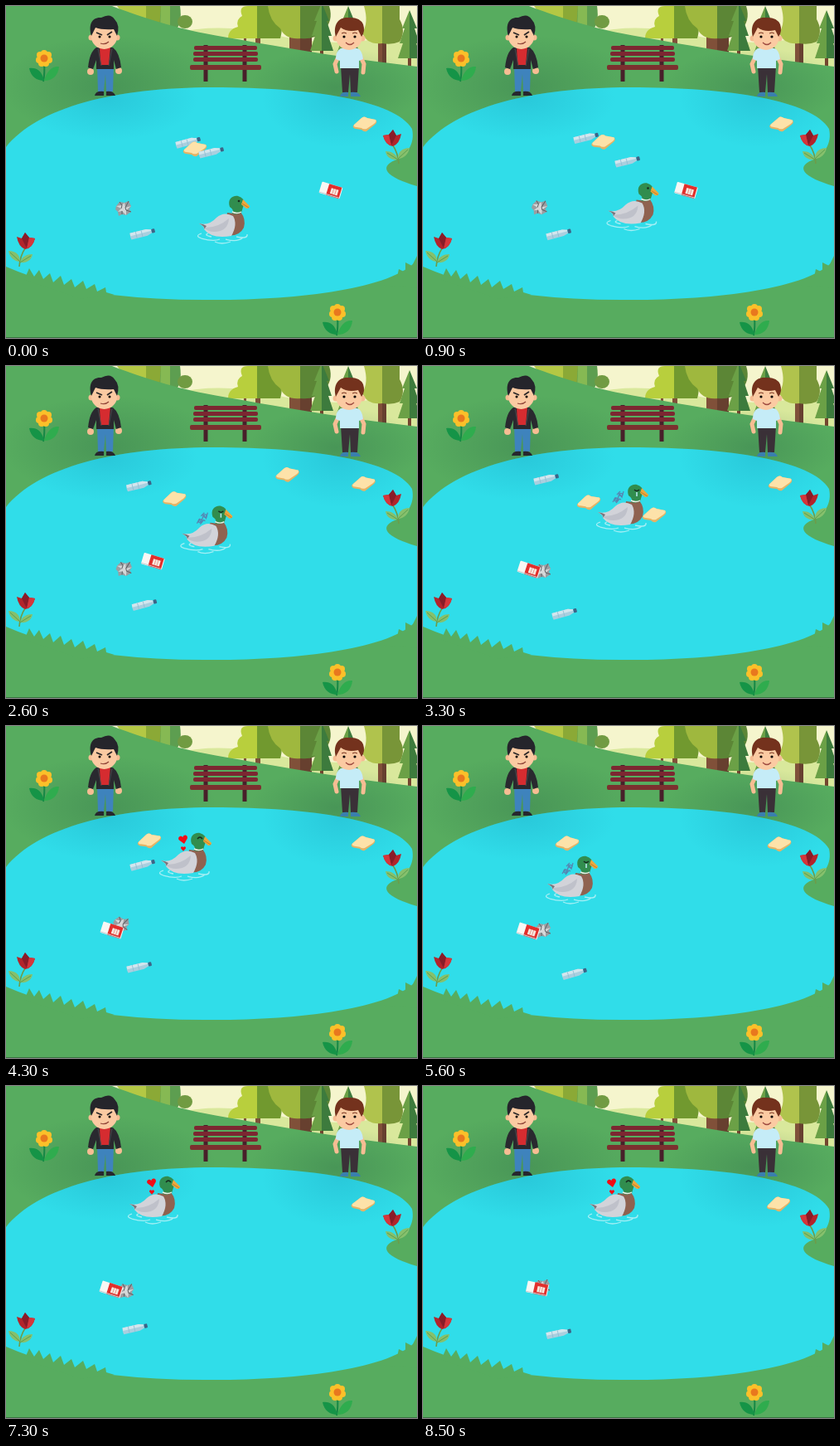
Recreate the animation shown at these times as an HTML page. Size 496 by 400 pixels, loop 8.6 s.

```html
<!DOCTYPE html>
<html lang="en">
<head>
<meta charset="utf-8">
<title>Duck pond</title>
<style>
html, body { margin: 0; width: 100%; height: 100%; overflow: hidden; background: #57ac5f; }
svg { display: block; width: 100vw; height: 100vh; }
</style>
</head>
<body>
<svg viewBox="0 0 496 400" preserveAspectRatio="none">
<defs>
  <radialGradient id="shade"><stop stop-color="#235c42" stop-opacity=".28"/><stop offset="1" stop-color="#235c42" stop-opacity="0"/></radialGradient>
  <radialGradient id="poolShade"><stop stop-color="#168fb0" stop-opacity=".26"/><stop offset="1" stop-color="#168fb0" stop-opacity="0"/></radialGradient>
  <clipPath id="pool"><use href="#pondShape"/></clipPath>
  <path id="pondShape" d="M0 170C38 122 132 98 250 98C370 98 470 114 490 148C494 166 484 180 469 186C450 194 458 206 496 217V306C466 342 345 355 240 354Q180 354 128 348Q60 340 0 314Z"/>

  <g id="daisy">
    <path d="M0 6Q1 18-1 28" fill="none" stroke="#168845" stroke-width="2"/>
    <path d="M0 27C-3 14-10 11-18 12C-16 22-9 27 0 27Z" fill="#159447"/>
    <path d="M0 27C3 16 9 9 18 10C17 21 10 27 0 27Z" fill="#2fac4e"/>
    <g fill="#fbc02a"><circle cx="0" cy="-6" r="4"/><circle cx="5" cy="-4" r="4"/><circle cx="6" cy="2" r="4"/><circle cx="2" cy="6" r="4"/><circle cx="-3" cy="6" r="4"/><circle cx="-6" cy="2" r="4"/><circle cx="-5" cy="-4" r="4"/></g>
    <circle r="4.5" fill="#e8781e"/>
  </g>
  <g id="tulip">
    <path d="M-1 8Q-7 17-8 30" fill="none" stroke="#6d9c4a" stroke-width="1.6"/>
    <path d="M-7 24C-14 24-20 18-21 11C-12 11-7 16-7 24ZM-7 25C-5 18 1 15 8 15C7 22 1 26-7 25Z" fill="#86c06c"/>
    <path d="M-7 24L-19 13M-7 25L6 17" stroke="#5c9f50"/>
    <path d="M-11-6L-5-4L-1-11L4-5L11-4Q8 8-1 9Q-9 6-11-6Z" fill="#b3242b"/>
    <path d="M-5-4L-1-11L4-5L1 8Z" fill="#891c28"/>
    <path d="M4-5L11-4Q8 7 1 8Z" fill="#d4373b"/>
  </g>
  <g id="pine">
    <path d="M-2 20H2V36H-2Z" fill="#74452f"/>
    <path d="M0-34L-9-12H-6L-12 6H-8L-14 24H0Z" fill="#6ba046"/>
    <path d="M0-34L9-12H6L12 6H8L14 24H0Z" fill="#3d7b3d"/>
  </g>

  <g id="bottle">
    <path d="M-15-4Q-16 0-15 4H5L11 2V-2L5-4Z" fill="#a9cfdf"/>
    <path d="M-15-4H5L11-2V-.5H-15Z" fill="#d3e6ee"/>
    <path d="M-8-4V4M-1-4V4" stroke="#8fbdd3" stroke-width=".8"/>
    <rect x="11" y="-2.5" width="4" height="5" rx="1" fill="#3c6487"/>
  </g>
  <g id="bread">
    <path d="M-14 2L-4-7Q-1-10 3-7L13-5Q16-2 12 1L2 9Q-1 10-4 7L-11 6Q-15 5-14 2Z" fill="#e5b365"/>
    <path d="M-13 1L-4-7Q-1-10 3-7L13-5Q15-3 11 0L2 6Q-2 7-4 5L-10 4Q-14 4-13 1Z" fill="#fde2a9"/>
  </g>
  <g id="box">
    <rect x="-13" y="-7" width="26" height="14" rx="1" fill="#f8f7f4"/>
    <path d="M-4-7H12V7H-4Z" fill="#e22f2c"/>
    <path d="M0-3H9V4H0Z" fill="#f7e8e0"/>
    <path d="M-13 6H13" stroke="#c3cbd0"/>
    <path d="M3-3V4M6-3V4" stroke="#df6e65" stroke-width=".6"/>
  </g>
  <g id="foil">
    <path d="M-9-3L-5-8L1-7L6-9L9-3L7 1L9 4L3 8L-2 7L-6 9L-7 4L-10 1Z" fill="#9b9da1"/>
    <path d="M-9-3L-2-4L1-7L2-1L9-3L3 2L3 8L-2 3L-7 4L-3 0Z" fill="#d5d7d8"/>
    <path d="M-5-8L-2-4L-3 0M6-9L2-1L3 2L9 4M-2 7L-2 3" fill="none" stroke="#5d6064" stroke-width="1"/>
  </g>
  <path id="heart" d="M0 5L-5-.5C-7-4-2-7 0-3C2-7 7-4 5-.5Z" fill="#f20d16"/>
</defs>

<rect width="496" height="400" fill="#f5f5cd"/>
<path d="M205 32Q260 20 320 34T430 42T496 35V90H200Z" fill="#d9e89c"/>

<!-- trees -->
<g>
  <path d="M134 0H170V25Q150 23 134 0Z" fill="#b4c844"/>
  <path d="M169 0H187L190 25H169Z" fill="#8ba936"/>
  <path d="M187 0H210Q213 22 205 28H185Z" fill="#5d9e50"/>
  <path d="M187 0H198V28H186Z" fill="#86b953"/>
  <ellipse cx="216" cy="19" rx="9" ry="8" fill="#719b42"/>
  <path d="M301 12H307V49H301ZM287 33H290V42H287Z" fill="#805039"/>
  <path d="M268 39Q268 28 280 25Q277 16 285 12Q280 0 292 0H304V39Z" fill="#b8cf3d"/>
  <path d="M303 0H323Q330 7 326 15Q336 22 331 39H303Z" fill="#71992f"/>
  <path d="M342 30H369V61H342Z" fill="#805039"/>
  <path d="M355 30H369V61H355Z" fill="#67402f"/>
  <path d="M316 0H356V39Q337 41 331 27Q318 18 316 0Z" fill="#9fb83e"/>
  <path d="M355 0H390Q396 19 382 30Q373 41 355 39Z" fill="#5c8636"/>
  <use href="#pine" x="381" y="30"/>
  <use href="#pine" x="413" y="34"/>
  <path d="M449 32H459V73H449Z" fill="#805039"/>
  <path d="M454 32H459V73H454Z" fill="#67402f"/>
  <path d="M432 0H454V45Q435 47 430 32Q438 20 432 0Z" fill="#b0c34d"/>
  <path d="M454 0H475V16Q483 30 475 43Q466 47 454 45Z" fill="#789538"/>
  <use href="#pine" x="487" y="39"/>
</g>

<path d="M0 0H128C154 10 198 25 240 33C300 44 400 62 496 73V400H0Z" fill="#57ac5f"/>
<ellipse cx="125" cy="97" rx="130" ry="62" fill="url(#shade)"/>
<ellipse cx="398" cy="98" rx="105" ry="48" fill="url(#shade)"/>
<use href="#pondShape" fill="#30dde9"/>
<g clip-path="url(#pool)">
  <ellipse cx="122" cy="112" rx="110" ry="50" fill="url(#poolShade)"/>
  <ellipse cx="404" cy="110" rx="95" ry="60" fill="url(#poolShade)"/>
</g>
<path d="M22 330L28 316L34 326L40 318L45 329L53 322L57 333L66 325L70 336L79 329L83 339L93 331L97 341L107 335L110 344L120 339L121 345L131 348L90 353Z" fill="#57ac5f"/>
<path d="M456 337L466 326L472 327L474 317L482 321L482 309L490 313L496 301V340Z" fill="#57ac5f"/>
<path d="M0 399.5H496" stroke="#3c7244"/>

<!-- bench -->
<g>
  <path d="M241 47V91M288 47V91" stroke="#48202a" stroke-width="5"/>
  <g fill="#7c2731"><rect x="227" y="48" width="76" height="5" rx="2"/><rect x="226" y="55" width="78" height="5" rx="2"/><rect x="226" y="62" width="78" height="5" rx="2"/></g>
  <rect x="222" y="71" width="86" height="6" rx="2" fill="#7c302f"/>
</g>

<!-- man in a jacket -->
<g>
  <path d="M110 72H130L129 103H121L120 82L118 103H111Z" fill="#3e83bd"/>
  <path d="M107 108Q108 102 118 103V108ZM121 103Q130 102 132 108H121Z" fill="#26272e"/>
  <circle cx="102" cy="79" r="4" fill="#f6bd93"/><circle cx="136" cy="78" r="4" fill="#f6bd93"/>
  <path d="M109 50H129Q137 56 139 74L133 76L130 65V76H109V65L105 76L99 74Q101 55 109 50Z" fill="#29292f"/>
  <path d="M113 50H126L124 71H114Z" fill="#d52c30"/>
  <path d="M111 51L115 72M128 51L124 72" stroke="#49474c"/>
  <circle cx="103" cy="38" r="3.5" fill="#f6bd93"/><circle cx="134" cy="38" r="3.5" fill="#f6bd93"/>
  <ellipse cx="118.500" cy="37" rx="15.500" ry="15" fill="#fbcaa2"/>
  <path d="M103 36C99 22 104 13 115 14Q126 8 131 16Q138 23 134 36L130 28Q116 29 108 26Z" fill="#25252b"/>
  <path d="M109 32L116 35M122 35L128 31" stroke="#2b2828" stroke-width="1.8"/>
  <circle cx="113" cy="37" r="1.5"/><circle cx="125" cy="37" r="1.5"/>
  <path d="M114 45Q120 47 124 43" fill="none" stroke="#94483b" stroke-width="1.3"/>
</g>

<!-- man in a T-shirt -->
<g>
  <path d="M402 59L397 70L399 79M427 59L432 70L431 80" fill="none" stroke="#f6bd93" stroke-width="5" stroke-linecap="round"/>
  <path d="M404 72H426L424 104H416L415 82L413 104H406Z" fill="#3a3037"/>
  <path d="M403 109Q404 103 413 104V109ZM416 104Q426 103 428 109H416Z" fill="#397fae"/>
  <path d="M404 51H424Q430 53 431 64L426 66V75H403V66L398 64Q398 54 404 51Z" fill="#c5ecf7"/>
  <circle cx="398" cy="39" r="3.500" fill="#f6bd93"/><circle cx="430" cy="39" r="3.500" fill="#f6bd93"/>
  <ellipse cx="414" cy="38" rx="15.500" ry="15" fill="#fbcaa2"/>
  <path d="M398 37C394 22 402 13 413 14Q427 13 431 22Q434 31 429 37L425 29Q412 32 404 26Z" fill="#74321d"/>
  <path d="M405 33Q408 31 411 33M418 33Q421 31 424 33" fill="none" stroke="#74321d"/>
  <circle cx="408" cy="37" r="1.600"/><circle cx="421" cy="37" r="1.600"/>
  <path d="M410 44Q415 49 420 44" fill="none" stroke="#9e493f" stroke-width="1.300"/>
</g>

<use href="#daisy" x="46" y="63"/>
<use href="#daisy" x="400" y="369"/>
<use href="#tulip" x="24" y="284"/>
<use href="#tulip" transform="translate(466 160) scale(-1 1)"/>

<g id="items"></g>

<g id="duck">
  <g fill="none" stroke="#a5eff5" stroke-width="1.300">
    <path d="M236 274Q227 277 236 280Q250 284 258 281M244 274Q238 276 248 278M265 281Q279 285 286 279M278 278Q292 281 291 275M252 284Q260 288 271 284"/>
  </g>
  <path d="M267 249Q277 251 283 248Q290 257 287 267Q281 279 264 276Z" fill="#8f6250"/>
  <path d="M233 262Q245 265 254 255Q263 247 274 253Q280 263 272 277Q248 281 239 269Q241 267 233 262Z" fill="#d2d3d9"/>
  <path d="M238 267Q255 268 269 256Q268 272 251 272Q244 272 238 267Z" fill="#bfc1ca"/>
  <path d="M233 262Q239 263 242 265L239 269Q241 266 233 262Z" fill="#77747b"/>
  <path d="M273 250Q276 246 270 242C267 233 273 228 280 229Q288 231 287 239L284 249Q278 252 273 250Z" fill="#318d4e"/>
  <path d="M273 248Q279 251 284 248" fill="none" stroke="#ecefe9" stroke-width="1.400"/>
  <path d="M286 233L294 241Q294 244 290 244L284 239Z" fill="#eda83d"/>
  <path d="M285 238L293 243" stroke="#b87526" stroke-width=".8"/>
  <circle id="openEye" cx="281" cy="235" r="1.300" fill="#16291f"/>
  <path id="happyEye" d="M277 236Q280 232 283 236" fill="none" stroke="#16291f" stroke-width="1.400"/>
  <g id="sadEye"><path d="M277 235Q280 238 283 235" fill="none" stroke="#16291f" stroke-width="1.400"/><path d="M280 238V243" stroke="#bceaf4" stroke-width="1.500"/></g>
  <g id="hearts"><use href="#heart" transform="translate(260 237) rotate(-12)"/><use href="#heart" transform="translate(260 248) scale(.55)"/></g>
  <g id="gloom" fill="none" stroke="#5686b2" stroke-width="1.300">
    <path d="M251 250L254 245L256 249L259 240L262 244L264 237M255 251L259 246L261 247M256 241L260 237"/>
    <circle cx="255" cy="247" r="2"/><circle cx="261" cy="241" r="1.700"/>
  </g>
</g>
</svg>

<script>
const LOOP = 8600, STEP = 100;
const TIMES = [0, 1800, 3300, 4300, 5600, 7300, 8500];
const byId = id => document.getElementById(id);

// Poses are [x, y, rotation], one for each moment in TIMES unless the item has its own times.
const items = [
  { shape: 'bottle', to: 4700, poses: [[220,164,-15], [174,153,-13], [149,136,-14], [165,167,-15], [165,170,-15]] },
  { shape: 'bread', to: 6500, poses: [[228,172,0], [207,155,-2], [200,164,-2], [173,138,-2], [174,141,4], [174,141,4]] },
  { shape: 'bottle', to: 1200, poses: [[248,176,-14], [246,198,-14]] },
  { shape: 'bread', poses: [[433,142,0], [432,142,2], [431,141,-1], [431,141,2], [430,142,3], [431,142,4], [429,142,-3]] },
  { shape: 'bread', from: 2000, to: 3600, times: [2000, 3200], poses: [[400,82,0], [279,179,0]] },
  { shape: 'foil', poses: [[142,244,0], [140,242,12], [145,247,0], [139,239,18], [145,246,0], [145,247,5], [144,242,0]] },
  { shape: 'box', times: [0, 1800, 3200, 4300, 5600, 7300, 8500],
    poses: [[392,222,17], [243,222,15], [128,245,18], [128,246,18], [127,247,18], [127,245,18], [138,244,12]] },
  { shape: 'bottle', poses: [[165,274,-14], [163,275,-15], [171,298,-15], [161,290,-14], [183,298,-16], [156,292,-13], [164,298,-12]] }
];
const duckPath = [[0,0], [-19,-31], [-22,-86], [-46,-100], [-83,-72], [-84,-120], [-32,-120]];

function poseAt(t, poses, times = TIMES) {
  const last = poses.length - 1;
  let i = 0;
  while (i < last - 1 && t >= times[i + 1]) i++;
  const k = Math.min(1, Math.max(0, (t - times[i]) / (times[i + 1] - times[i])));
  return poses[i].map((v, n) => v + (poses[i + 1][n] - v) * k);
}

function moodAt(t) {
  if (t < 1200) return 'calm';
  if (t < 3600) return 'sad';
  if (t < 4700) return 'happy';
  return t < 6500 ? 'sad' : 'happy';
}

function show(id, visible) {
  byId(id).style.display = visible ? '' : 'none';
}

for (const item of items) {
  item.node = document.createElementNS('http://www.w3.org/2000/svg', 'use');
  item.node.setAttribute('href', '#' + item.shape);
  byId('items').append(item.node);
}

function draw(t) {
  for (const { node, poses, times, from = 0, to = LOOP } of items) {
    const [x, y, turn] = poseAt(t, poses, times);
    node.style.display = t >= from && t < to ? '' : 'none';
    node.setAttribute('transform', `translate(${x} ${y}) rotate(${turn})`);
  }
  byId('duck').setAttribute('transform', `translate(${poseAt(t, duckPath)})`);
  const mood = moodAt(t);
  show('openEye', mood === 'calm');
  show('happyEye', mood === 'happy');
  show('hearts', mood === 'happy');
  show('sadEye', mood === 'sad');
  show('gloom', mood === 'sad');
}

const start = performance.now();
function frame() {
  const elapsed = (performance.now() - start) % LOOP;
  draw(Math.floor(elapsed / STEP) * STEP);
  requestAnimationFrame(frame);
}
frame();
</script>
</body>
</html>
```
